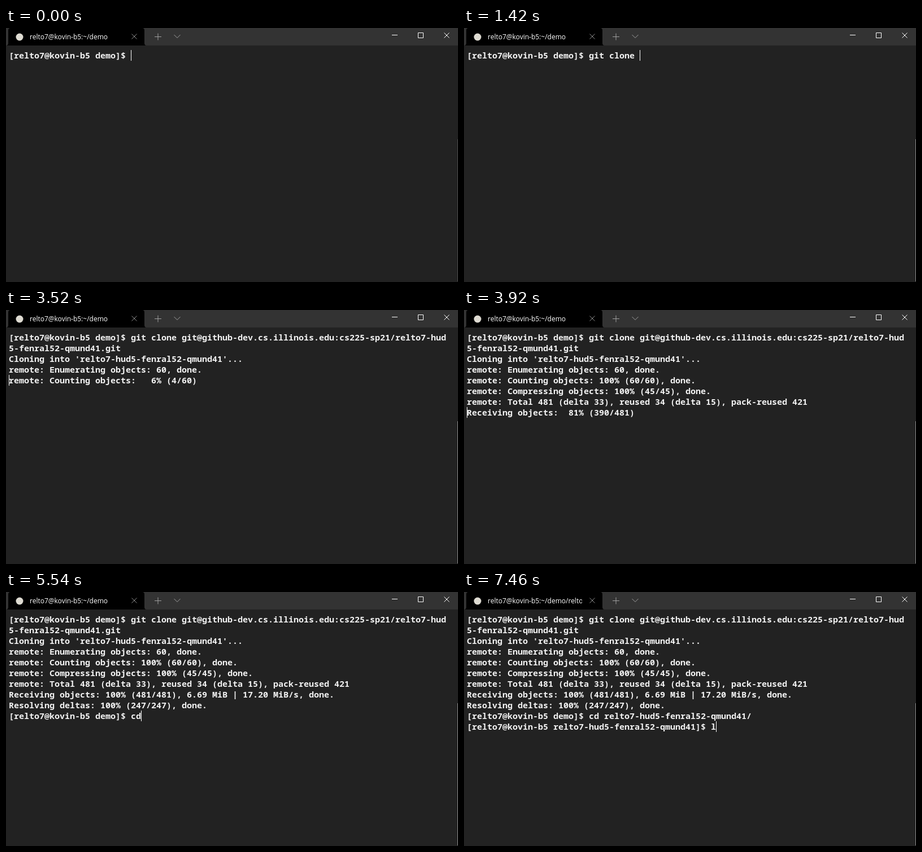
Write an HTML page that moves like this. It is 800 by 450 pixels and loops after 8000 ms.

```html
<!DOCTYPE html>
<html lang="en">
<head>
<meta charset="utf-8">
<title>Terminal</title>
<style>
  html, body { margin: 0; width: 100%; height: 100%; overflow: hidden; background: #222; }
  #stage { position: relative; width: 800px; height: 450px; overflow: hidden; background: #222; }
  #stage > * { position: absolute; }
  #bar { left: 0; top: 0; }
  #title {
    left: 42px; top: 7px; width: 167px; overflow: hidden; white-space: nowrap;
    font: 12px/18px "Open Sans", "Noto Sans", sans-serif; color: #fff;
  }
  #text {
    left: 5px; top: 39px; margin: 0; white-space: pre; color: #f2f2f2;
    font: 600 15px/19px "Noto Sans Mono", "DejaVu Sans Mono", monospace;
    font-variant-ligatures: none;
  }
  #cursor { width: 1px; height: 19px; background: #fff; }
  #thumb { left: 799px; top: 197px; width: 1px; height: 252px; }
</style>
</head>
<body>
<div id="stage">
  <svg id="bar" width="800" height="31" fill="none">
    <path fill="#333" d="M0 0H800V31H0Z"/>
    <path fill="#000" d="M0 31Q4 31 4 27V4Q4 0 8 0H241Q245 0 245 4V27Q245 31 249 31Z"/>
    <circle cx="24" cy="16" r="6.5" fill="#dedbd2"/>
    <path stroke="#8c8c8c" d="M222.5 10.5l9 9m0-9l-9 9"/>
    <path stroke="#a0a0a0" d="M263 15.5h12m-6-6v12M297.5 12l5.5 5.5 5.5-5.5"/>
    <path stroke="#fff" d="M683 12.5h10M729.5 8.5h9v9h-9zM775.5 8.5l9 9m0-9l-9 9"/>
  </svg>
  <div id="title"></div>
  <pre id="text"></pre>
  <div id="cursor"></div>
  <div id="thumb"></div>
</div>
<script>
  const LOOP = 8000, COLS = 86, CELL = 9, LINE = 19;
  const user = "relto7", host = "kovin-b5";
  const repo = `${user}-hud5-fenral52-qmund41`;
  const prompt = dir => `[${user}@${host} ${dir}]$ `;
  const $ = id => document.getElementById(id);

  const wrap = s => s.replace(new RegExp(`.{${COLS}}(?=.)`, "g"), "$&\n");
  const scenes = [];
  let screen = "";

  // cursor: "end" of the text, "home" of its last line, or "off"
  function show(time, text, cursor = "end") {
    const rows = text.split("\n");
    const col = cursor === "home" ? 0 : rows[rows.length - 1].length;
    scenes.push({ time, text, col, row: rows.length - 1, on: cursor !== "off" });
  }
  function add(time, text, cursor) {
    screen = wrap(screen + text);
    show(time, screen, cursor);
  }
  function type(keys, times) {
    times.forEach((time, i) => add(time, keys[i]));
  }
  const progress = (time, text, cursor = "home") => show(time, screen + text, cursor);

  add(0, prompt("demo"));
  type("git clone ", [100, 200, 300, 400, 700, 800, 1000, 1200, 1310, 1420]);
  add(2320, `git@github-dev.cs.illinois.edu:cs225-sp21/${repo}.git`);
  add(3010, `\nCloning into '${repo}'...\n`);

  screen += "remote: Enumerating objects: 60, done.\n";
  progress(3520, "remote: Counting objects:   6% (4/60)");
  screen += "remote: Counting objects: 100% (60/60), done.\n";
  progress(3620, "remote: Compressing objects:   2% (1/45)");
  screen += "remote: Compressing objects: 100% (45/45), done.\n";
  progress(3720, "Receiving objects:   0% (1/481)");
  progress(3820, "Receiving objects:  34% (164/481)");
  screen += "remote: Total 481 (delta 33), reused 34 (delta 15), pack-reused 421\n";
  progress(3920, "Receiving objects:  81% (390/481)");
  screen += "Receiving objects: 100% (481/481), 6.69 MiB | 17.20 MiB/s, done.\n";
  progress(4020, "Resolving deltas:   0% (0/247)", "off");
  add(4220, "Resolving deltas: 100% (247/247), done.\n");
  show(4720, screen, "off");

  add(4820, prompt("demo"), "off");
  type("cd " + repo[0], [5340, 5540, 5640, 5840]);
  add(6040, repo.slice(1) + "/");
  add(6540, "\n" + prompt(repo));
  show(7140, screen, "off");
  add(7460, "l");

  let last;
  function frame(now) {
    const t = now % LOOP;
    const scene = scenes.findLast(s => s.time <= t);
    if (scene !== last) {
      last = scene;
      $("text").textContent = scene.text;
      const c = $("cursor").style;
      c.left = 5 + scene.col * CELL + "px";
      c.top = 39 + scene.row * LINE + "px";
      c.visibility = scene.on ? "visible" : "hidden";
      $("title").textContent = `${user}@${host}:~/demo` + (t < 6540 ? "" : "/" + repo);
      $("thumb").style.background = t < 1310 ? "#4d4d4d" : "#8a8a8a";
    }
    requestAnimationFrame(frame);
  }
  const start = performance.now();
  const tick = () => frame(Math.max(0, performance.now() - start));
  frame(0);
</script>
</body>
</html>
```
